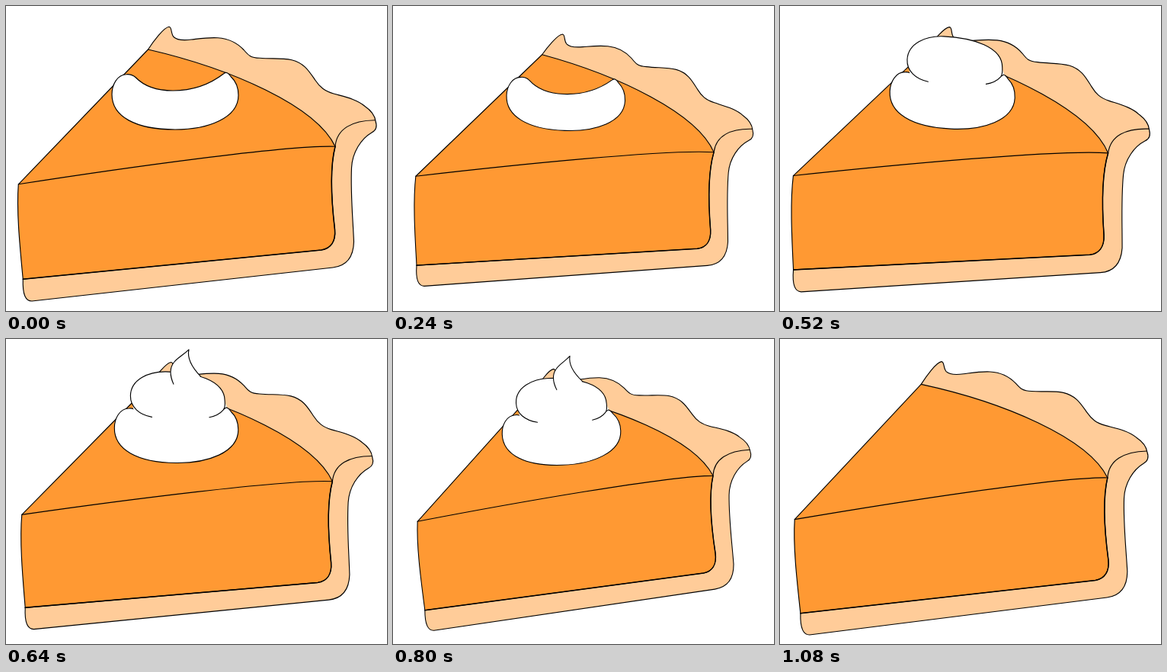
Animation of 500x400 px, one loop 1120 ms. Source, as an HTML page:

```html
<!DOCTYPE html>
<html lang="en">
<head>
<meta charset="utf-8">
<title>Pie slice</title>
<style>
  html, body { margin: 0; width: 100%; height: 100%; overflow: hidden; background: #fff; }
  svg { display: block; width: 500px; height: 400px; }
  path { stroke: #000; stroke-width: 1.15; stroke-linejoin: round; stroke-linecap: round; }
  .crust { fill: #fc9; }
  .filling { fill: #f93; }
  .cream { fill: #fff; }
  .line { fill: none; }
  .edge { fill: none; stroke-width: 1.5; }
  .patch { fill: #fff; stroke: none; }
</style>
</head>
<body>
<svg viewBox="0 0 500 400">
  <g id="pie">
    <path class="crust" d="M186.500 57 C193 47 207 28 214 27.300 C218 27.500 216 36 220 40.500
      C225 45.500 235 45 243 44 C256 42.500 265 41 278 41.700 C293 42.700 304 49 312 57.500
      C318 64.500 321 68 333 68.300 C348 69.700 361 67.700 375 70.700 C392 75 398 86 406 97.500
      C412 106.500 418 111.500 430 115 C444 119 460 122 471 131.500 C479 137 484 143 485 151
      C487 157 486 163 480 166 C466 174 454.500 192 453.500 212
      C452 245 455 275 456.500 309 C456 330 446 341 429 343 L34 387
      C26 387 21.500 379 22.300 358.300"/>
    <path class="filling" d="M16.300 233.800 L186.500 57 C295 82 407 131 432 184.300
      C425 212 427 255 431.500 293 C433 309 426 318 414 320 L22.300 358.300
      C18.500 318 13.500 270 16.300 233.800 Z"/>
    <path class="edge" d="M432 184.300 C425 212 427 255 431.500 293 C433 309 426 318 414 320
      L22.300 358.300"/>
    <path class="line" d="M16.300 233.800 C150 213 370 182 432 184.300 C434 161 454 150 484.500 149.700"/>
    <g id="base">
      <path class="cream" d="M139 116 C139 103 146 90 158 89.700 C164 89 167 91 170 93.500
        C183 107 200 111 219 111 C246 111 268 102.500 286 88.500 C289 86 291.500 87.500 295 92.500
        C302 99 305 107 305 117 C305 147 265 162 222 162 C170 162 139 145 139 116 Z"/>
    </g>
    <g id="middle">
      <path class="patch" d="M164 90 C170 112 205 124 228 124 C255 124 280 112 289.500 87
        L286 78 L160 73 Z"/>
      <path class="cream" d="M189 101 C172 98 160 88 160 73 C160 51 184 40 207 40
        C245 40 286 50 286.500 78 C287 83 287 87 285 90 C280 96 274 99 266 100.500"/>
      <path class="line" d="M285.500 89 L289 87"/>
    </g>
    <g id="swirl">
      <path class="cream" d="M217.500 56.500 C212 44.500 211.500 35 218 27 C223 20.500 230 17.500 237.500 10
        C235 22 241 33 254 46"/>
    </g>
  </g>
</svg>
<script>
  const LOOP = 1120, STEP = 40, STAGE = LOOP / 4;
  const MIN_SCALE = 0.927;
  const TILT = [[0, 0], [440, 4.03], [920, -4.01], [LOOP, 0]];
  const pie = document.getElementById('pie');
  const layers = ['base', 'middle', 'swirl'].map(id => document.getElementById(id));

  function interpolate(keys, t) {
    const i = keys.findIndex(([time]) => time > t);
    const [t0, v0] = keys[i - 1], [t1, v1] = keys[i];
    return v0 + (v1 - v0) * (t - t0) / (t1 - t0);
  }

  function draw(t) {
    const half = LOOP / 2;
    const closeness = Math.abs((t % half) / STAGE - 1);
    const scale = MIN_SCALE + (1 - MIN_SCALE) * closeness;
    const angle = interpolate(TILT, t);
    pie.setAttribute('transform',
      `translate(250 200) rotate(${angle}) scale(${scale}) translate(-250 -200)`);

    // Each stage adds a dollop; the last one is bare.
    const stage = Math.floor(t / STAGE);
    layers.forEach((layer, i) => {
      layer.style.display = stage < 3 && i <= stage ? '' : 'none';
    });
  }

  const start = performance.now();
  function tick() {
    const t = (performance.now() - start) % LOOP;
    draw(Math.floor(t / STEP) * STEP);
    requestAnimationFrame(tick);
  }
  tick();
</script>
</body>
</html>
```
